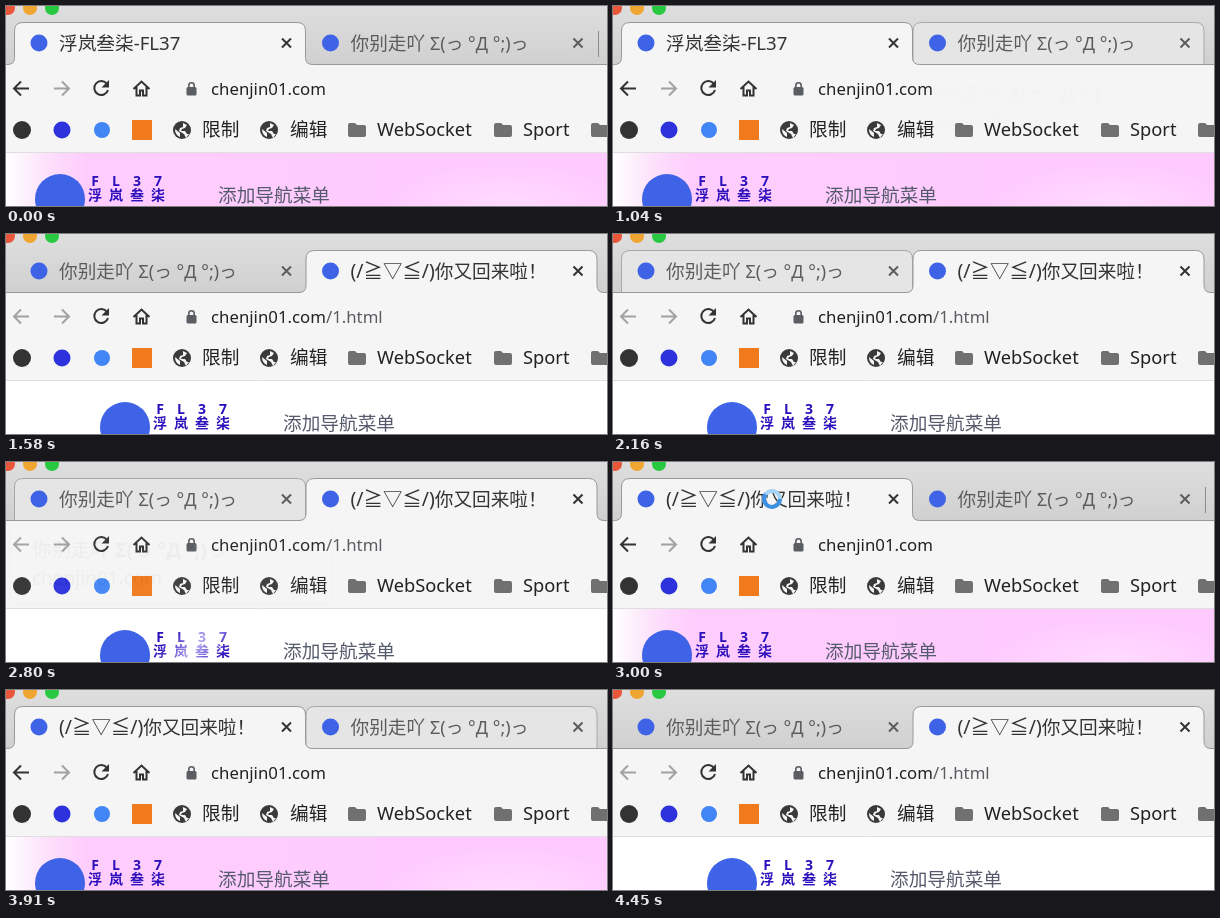
Animation of 601x200 px, one loop 5660 ms. Source, as an HTML page:

```html
<!DOCTYPE html>
<html lang="zh-CN">
<head>
<meta charset="utf-8">
<title>Browser tabs</title>
<style>
html, body { margin: 0; width: 100%; height: 100%; overflow: hidden; background: #f5f5f5 }
svg { display: block; font: 18.67px "Noto Sans", "Noto Sans CJK SC", sans-serif }
.line { fill: none; stroke: #333; stroke-width: 2 }
.mark { font-weight: 900; font-size: 14px; text-anchor: middle; fill: url(#shine) }
.latin { font-size: 18.3px }
.away { font-size: 17.9px }
.back { font-size: 19.4px }
</style>
</head>
<body>
<svg id="stage" width="601" height="200" viewBox="0 0 601 200"></svg>
<script>
const LOOP = 5660, TAB_W = 291.5;
const AWAY = '你别走吖 <tspan class="away">Σ(っ °Д °;)っ</tspan>';
const BACK = '<tspan class="back">(/≧▽≦/)</tspan>你又回来啦！';
const NAME = '浮岚叁柒', CODE = 'FL37', HOST = 'chenjin01.com';

const text = (x, y, s, attrs = '') => `<text x="${x}" y="${y}" ${attrs}>${s}</text>`;
const dot = (x, y, r, fill) => `<circle cx="${x}" cy="${y}" r="${r}" fill="${fill}"/>`;
const bookmark = (x, s, kind = '') => text(x, 130, s, `fill="#222" class="${kind}"`);
const folder = x => `<path transform="translate(${x} 117)" fill="#707070"
  d="M2 0h5l2 2h7q2 0 2 2v8q0 2-2 2H2q-2 0-2-2V2q0-2 2-2z"/>`;
const globe = x => `<g transform="translate(${x} 124)">${dot(0, 0, 9, '#3a3a3a')}
  <path fill="#f5f5f5" d="M-7-1l5 4v4q-5-2-5-8zM1-7l4 2-2 3-3 1-1 2h4l2 3 2 0-3 4-2-4-5-3 1-3 3-1z"/></g>`;
const tabPath = x => `M-9 147V58.5H${x - 7}q7 0 7-7V25q0-8.5 8.5-8.5h274q8.5 0 8.5 8.5v26.5q0 7 7 7H620V147z`;
const tab = i => `<g transform="translate(${i * TAB_W} 0)">${dot(33, 37, 8.5, '#3f63e6')}
  ${text(53, 44, '', `id="title${i}"`)}
  <path id="close${i}" class="line" d="M276 32.5l9 9m0-9l-9 9"/></g>`;
const hoverTab = i => `<path id="hover${i}" transform="translate(${i * TAB_W} 0)" fill="#e5e5e5" stroke="#a8a8a8"
  d="M8.5 58.5V25q0-8.5 8.5-8.5h274q8.5 0 8.5 8.5v33.5z"/>`;

const stage = document.getElementById('stage');
stage.innerHTML = `
<defs>
  <linearGradient id="strip" x2="0" y2="1"><stop stop-color="#dedede"/><stop offset="1" stop-color="#d0d0d0"/></linearGradient>
  <linearGradient id="pink"><stop stop-color="#fff"/><stop offset=".03" stop-color="#fdf2fc"/>
    <stop offset=".07" stop-color="#fddffb"/><stop offset=".13" stop-color="#ffcdfd"/><stop offset="1" stop-color="#ffcaff"/></linearGradient>
  <radialGradient id="glow"><stop stop-color="#ffdcff"/><stop offset="1" stop-color="#ffdcff" stop-opacity="0"/></radialGradient>
  <linearGradient id="shine" gradientUnits="userSpaceOnUse" x1="-20" y1="-17" x2="20" y2="17">
    <stop stop-color="#2c10bc"/><stop offset=".5" stop-color="#b4a8f2"/><stop offset="1" stop-color="#2c10bc"/></linearGradient>
  <filter id="shadow" x="-10%" y="-20%" width="120%" height="140%"><feDropShadow dx="0" dy="1" stdDeviation="2" flood-opacity=".45"/></filter>
</defs>
<rect width="601" height="59" fill="url(#strip)"/>
${dot(2, 2, 7, '#e9573a')}${dot(24, 2, 7, '#f0a530')}${dot(46, 2, 7, '#28c940')}
${hoverTab(0)}${hoverTab(1)}
<path id="divider" d="M592.5 25v26" stroke="#8c8c8c"/>
<path id="active" fill="#f5f5f5" stroke="#999"/>
${tab(0)}${tab(1)}
<path id="backArrow" class="line" d="M23 82.5H8.5M15 75.5l-7 7 7 7"/>
<path class="line" style="stroke:#a2a2a2" d="M48 82.5h14.5M56 75.5l7 7-7 7"/>
<path class="line" d="M101 78a7 7 0 1 0 1 6"/><path d="M103 74v7.5h-7.5z" fill="#333"/>
<path class="line" d="M127.5 83l8-7.5 8 7.5M130.5 81v8.5h3.5v-5h3v5h3.5V81"/>
<rect x="180.5" y="81" width="10" height="8.5" rx="1.5" fill="#5a5d61"/>
<path class="line" style="stroke:#5a5d61;stroke-width:1.6" d="M182.8 82v-2.5a2.7 2.7 0 0 1 5.4 0V82"/>
<text x="205" y="89" font-size="16.8" fill="#222">${HOST}<tspan id="file" fill="#5e5a62">/1.html</tspan></text>
${dot(16, 124, 9, '#333')}${dot(56, 124, 8.5, '#2d32dc')}${dot(96, 124, 8, '#4285f4')}
<rect x="126" y="114" width="20" height="20" fill="#f07a1c"/>
${globe(176)}${bookmark(196, '限制')}${globe(263)}${bookmark(284, '编辑')}
${folder(342)}${bookmark(371, 'WebSocket', 'latin')}${folder(488)}${bookmark(517, 'Sport', 'latin')}${folder(585)}
<rect y="146" width="601" height="54" fill="#fff"/>
<g id="pageTint">
  <rect y="147" width="601" height="53" fill="url(#pink)"/>
  <rect x="370" y="147" width="231" height="53" fill="#ffcaff"/>
  <svg y="147" width="601" height="53"><ellipse cx="500" cy="58" rx="130" ry="50" fill="url(#glow)"/></svg>
</g>
<path d="M0 146.5h601" stroke="#dedede"/>
<g id="page">
  ${dot(54, 193, 25, '#3f63e6')}
  ${[...CODE].map((c, i) => text(89 + 21 * i, 180, c, 'class="mark"')).join('')}
  ${[...NAME].map((c, i) => text(89 + 21 * i, 194, c, 'class="mark"')).join('')}
  ${text(212, 196, '添加导航菜单', 'fill="#555a6c"')}
</g>
<g id="card" font-size="19.5" fill="#333">
  <rect y="58.5" width="322" height="83" rx="9" fill="#f7f7f7" stroke="#bbb" filter="url(#shadow)"/>
  <text x="22" y="95">你别走吖 <tspan font-weight="700">Σ(っ °Д °;)</tspan>っ</text>
  ${text(22, 122.5, HOST, 'font-size="19"')}
</g>
<g id="ring" fill="none" stroke-width="4">
  <circle r="8" stroke="#a5d3f5"/><circle r="8" stroke="#3c8fe2" stroke-dasharray="30 21"/>
</g>`;

const $ = id => document.getElementById(id);
const set = (id, attrs) => { for (const k in attrs) $(id).setAttribute(k, attrs[k]); };
const ramp = (t, a, b) => Math.min(1, Math.max(0, (t - a) / (b - a)));
const ease = p => p * p * (3 - 2 * p);
const within = (t, a, b) => t >= a && t < b;

function draw(t) {
  const second = within(t, 1330, 2920) || t >= 4210;
  const current = second ? 1 : 0;
  const firstTitle = t < 1330 ? `${NAME}-${CODE}` : BACK;

  [0, 1].forEach(i => {
    const on = i === current;
    $('title' + i).innerHTML = on ? (i ? BACK : firstTitle) : AWAY;
    set('title' + i, { fill: on ? '#333' : '#5c5c5c' });
    $('close' + i).style.stroke = on ? '#333' : '#5c5c5c';
  });
  set('active', { d: tabPath(8.5 + current * TAB_W) });

  // pointer over the inactive tab
  const hover0 = second && t < 2920 ? ramp(t, 2000, 2160) : 0;
  const hover1 = second ? 0 : t < 1330 ? ramp(t, 320, 560) : ramp(t, 3620, 3910);
  set('hover0', { opacity: hover0 });
  set('hover1', { opacity: hover1 });
  set('divider', { opacity: second ? 0 : 1 - hover1 });

  $('backArrow').style.stroke = second ? '#a2a2a2' : '#333';
  set('file', { visibility: second ? 'visible' : 'hidden' });
  set('pageTint', { visibility: second ? 'hidden' : 'visible' });
  set('page', { transform: `translate(${second ? 65 : 0} 0)` });

  // highlight gliding over the wordmark
  const start = second ? 2470 : 3050;
  const glide = within(t, start, start + 530) ? 28 + 0.3 * (t - start) : -200;
  set('shine', { gradientTransform: `translate(${glide} 182)` });

  const early = t < 2000;
  const cardAlpha = early
    ? 0.96 * ramp(t, 1040, 1210) * (1 - ramp(t, 1290, 1480))
    : t < 2920 ? 0.6 * ease(ramp(t, 2780, 2920)) : 0;
  set('card', { opacity: cardAlpha, transform: `translate(${early ? 291 : 4} 0)` });

  const x = 159 + 122 * ease(ramp(t, 3050, 3580)) + 140 * ramp(t, 3620, 3800);
  set('ring', {
    opacity: within(t, 2940, 3800) ? 1 - ramp(t, 3660, 3800) : 0,
    transform: `translate(${x} 37) rotate(${t * 0.36})`
  });
}

function frame() {
  draw(performance.now() % LOOP);
  requestAnimationFrame(frame);
}
frame();
</script>
</body>
</html>
```
